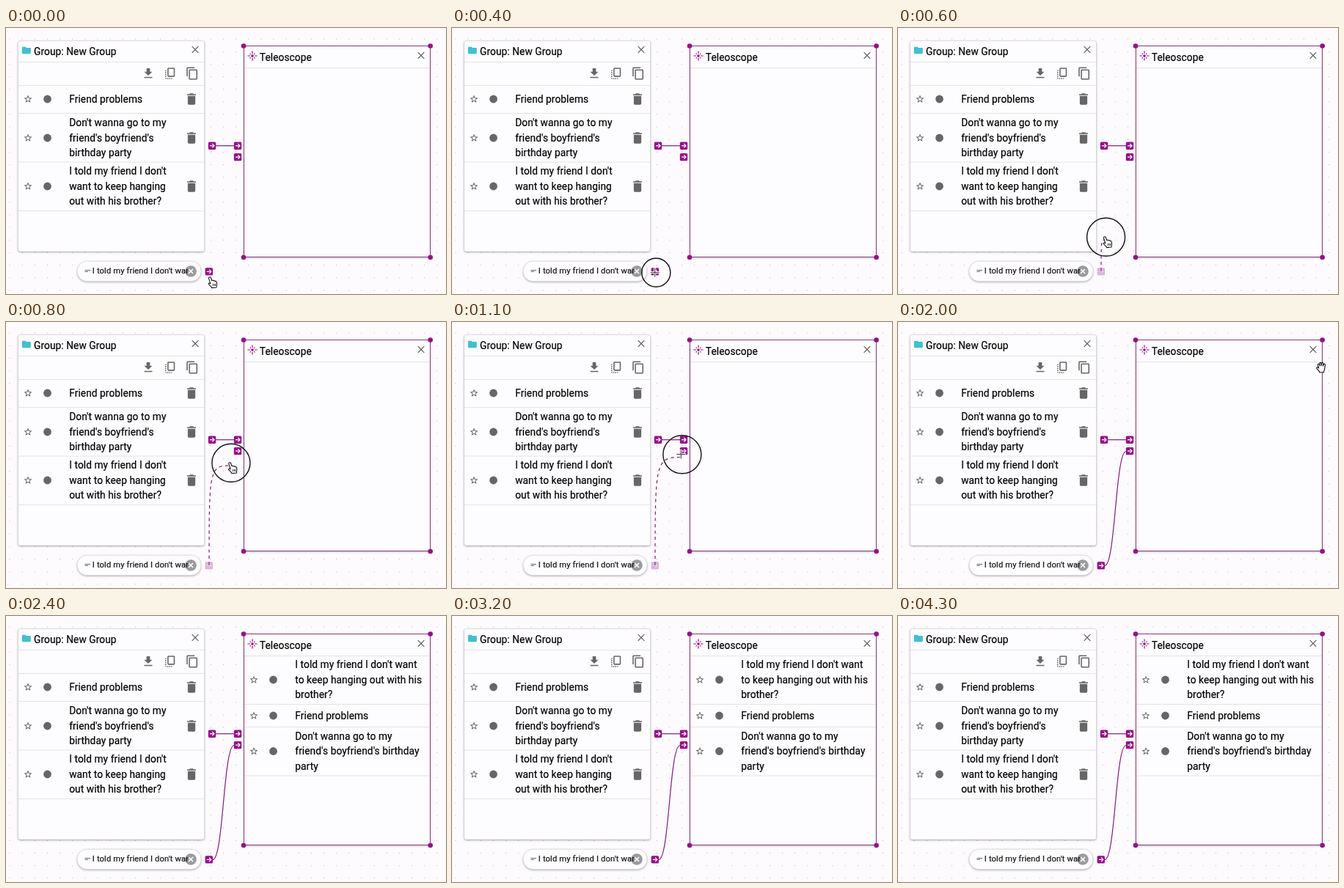
Write an HTML page with a canvas that moves like this. It is 600 px wide and 363 px high and loops after 4400 ms.

```html
<!DOCTYPE html>
<html lang="en">
<head>
<meta charset="utf-8">
<title>Workspace</title>
<style>
html, body { margin: 0; width: 100%; height: 100%; overflow: hidden; background: #fdfbfe; }
canvas { position: absolute; left: 0; top: 0; width: 600px; height: 363px; }
.text {
  position: absolute; white-space: pre; color: #000; -webkit-text-stroke: .2px #000;
  font: 13.71px/20.57px Roboto, Arial, sans-serif; letter-spacing: .08px;
}
.chip { font-size: 11.14px; letter-spacing: .15px; width: 131.2px; overflow: hidden; color: #1a1a1a; }
</style>
</head>
<body>
<canvas id="base"></canvas>
<div id="labels"></div>
<div id="results"></div>
<canvas id="over"></canvas>
<script>
const LOOP = 4400, STEP = 100, LINK = 1300, CUT = 2200;
const PURPLE = '#960f89', EDGE = '#7f1c79', FRAME = '#85407f', GREY = '#666', RULE = '#e5e3e7', PAPER = '#fdfcfe';
const LINE = 20.57, GAP = 17.14;

const ICON = {
  star: 'M22 9.24l-7.19-.62L12 2 9.19 8.63 2 9.24l5.46 4.73L5.82 21 12 17.27 18.18 21l-1.63-7.03L22 9.24zM12 15.4l-3.76 2.27 1-4.28-3.32-2.88 4.38-.38L12 6.1l1.71 4.04 4.38.38-3.32 2.88 1 4.28L12 15.4z',
  trash: 'M6 19c0 1.1.9 2 2 2h8c1.1 0 2-.9 2-2V7H6v12zM19 4h-3.5l-1-1h-5l-1 1H5v2h14V4z',
  download: 'M19 9h-4V3H9v6H5l7 7 7-7zM5 18v2h14v-2H5z',
  copyAll: 'M18 2H9c-1.1 0-2 .9-2 2v12c0 1.1.9 2 2 2h9c1.1 0 2-.9 2-2V4c0-1.1-.9-2-2-2zm0 14H9V4h9v12zM3 15v-2h2v2H3zm0-5.5h2v2H3v-2zM10 20h2v2h-2v-2zm-7-1.5v-2h2v2H3zM5 22c-1.1 0-2-.9-2-2h2v2zm3.5 0h-2v-2h2v2zm5 0v-2h2c0 1.1-.9 2-2 2zM5 6v2H3c0-1.1.9-2 2-2z',
  copy: 'M16 1H4c-1.1 0-2 .9-2 2v14h2V3h12V1zm3 4H8c-1.1 0-2 .9-2 2v14c0 1.1.9 2 2 2h11c1.1 0 2-.9 2-2V7c0-1.1-.9-2-2-2zm0 16H8V7h11v14z',
  folder: 'M10 4H4c-1.1 0-1.99.9-1.99 2L2 18c0 1.1.9 2 2 2h16c1.1 0 2-.9 2-2V8c0-1.1-.9-2-2-2h-8l-2-2z',
  flare: 'M7 11H1v2h6v-2zm2.17-3.24L7.05 5.64 5.64 7.05l2.12 2.12 1.41-1.41zM13 1h-2v6h2V1zm5.36 6.05l-1.41-1.41-2.12 2.12 1.41 1.41 2.12-2.12zM17 11v2h6v-2h-6zm-5-2c-1.66 0-3 1.34-3 3s1.34 3 3 3 3-1.34 3-3-1.34-3-3-3zm2.83 7.24l2.12 2.12 1.41-1.41-2.12-2.12-1.41 1.41zm-9.19.71l1.41 1.41 2.12-2.12-1.41-1.41-2.12 2.12zM11 23h2v-6h-2v6z',
  short: 'M4 9h16v2H4zm0 4h10v2H4z'
};
const POINTER = new Path2D('M-1.2.2C-.2-.8 1-.2 1.4 1L2.6 4.6C3.6 4 4.6 4.2 5 5C6 4.6 7 4.9 7.3 5.7C8.4 5.4 9.1 6 9.3 7C9.8 9.4 9.6 11 9 14L2.6 14.6C2 12.6.2 11.4-1.6 9.6C-2.4 8.6-1.2 7.6-.2 8.2L.8 8.9L-1.4 1.8C-1.6 1-1.6.6-1.2.2Z');
const HAND = new Path2D('M-3.2 1L-4.6-3.4C-4.8-4.8-3-5.2-2.5-4L-1.8-2L-2.2-5.6C-2.2-7-.4-7.2-.1-5.8L.2-2.4L.8-6C1.2-7.2 2.8-6.8 2.7-5.4L2.5-2L3.6-4.4C4.4-5.5 5.8-4.8 5.5-3.4L4.8 1.4C4.6 3.6 3.6 4.6 3.6 6.8L-2 6.8C-2.6 4.6-4.4 3.4-6 1.2C-6.8-.2-5-1-4.2 0Z');

// Cursor track: time, x, y
const TRACK = [
  [0, 278, 340], [100, 278, 339], [200, 277, 335], [400, 276.7, 333.5], [500, 277.5, 326],
  [600, 282, 285], [700, 295, 232], [800, 305.3, 192], [1000, 311.5, 182], [1200, 313, 179],
  [1500, 313, 179], [1600, 345, 152], [1700, 408, 108], [1800, 470, 78], [1900, 545, 66], [2000, 577, 62]
];
// Click ring: time, radius
const RING = [[300, 13], [400, 19.5], [500, 26], [1200, 26], [1300, 20], [1400, 10]];

function setup(id) {
  const c = document.getElementById(id), k = window.devicePixelRatio || 1;
  c.width = 600 * k;
  c.height = 363 * k;
  const g = c.getContext('2d');
  g.scale(k, k);
  return g;
}
const base = setup('base'), over = setup('over');
const results = document.getElementById('results');

function sample(keys, t, i) {
  const n = keys.findIndex(k => k[0] >= t);
  if (n < 0) return keys[keys.length - 1][i];
  if (n === 0) return keys[0][i];
  const a = keys[n - 1], b = keys[n];
  return a[i] + (b[i] - a[i]) * (t - a[0]) / (b[0] - a[0]);
}

function icon(g, name, x, y, scale, color) {
  g.save();
  g.translate(x, y);
  g.scale(scale, scale);
  g.translate(-12, -12);
  g.fillStyle = color;
  g.fill(new Path2D(ICON[name]));
  g.restore();
}
function dot(g, x, y, r, color) {
  g.fillStyle = color;
  g.beginPath();
  g.arc(x, y, r, 0, 7);
  g.fill();
}
function box(g, x, y, w, h, r, color) {
  g.fillStyle = color;
  g.beginPath();
  g.roundRect(x, y, w, h, r);
  g.fill();
}
function stroke(g, points, color, width) {
  g.strokeStyle = color;
  g.lineWidth = width;
  g.beginPath();
  points.forEach(p => g.lineTo(p[0], p[1]));
  g.stroke();
}
function cross(x, y, r, color, width) {
  stroke(base, [[x - r, y - r], [x + r, y + r]], color, width);
  stroke(base, [[x + r, y - r], [x - r, y + r]], color, width);
}
function paper(x, y, w, h, r) {
  base.save();
  base.shadowColor = 'rgba(0,0,0,.32)';
  base.shadowBlur = 3;
  base.shadowOffsetY = 1;
  box(base, x, y, w, h, r, PAPER);
  base.restore();
  base.strokeStyle = 'rgba(0,0,0,.12)';
  base.lineWidth = .7;
  base.stroke();
}
function rule(g, x1, x2, y) { stroke(g, [[x1, y], [x2, y]], RULE, 1); }

function port(g, x, y, alpha = 1) {
  g.save();
  g.globalAlpha = alpha;
  box(g, x - 5.2, y - 5.2, 10.4, 10.4, 1.6, PURPLE);
  stroke(g, [[x - 3, y], [x + 2.8, y]], '#fff', 1.2);
  stroke(g, [[x + .3, y - 2.7], [x + 3, y], [x + .3, y + 2.7]], '#fff', 1.2);
  g.restore();
}

function label(parent, x, mid, lines, cls = '') {
  const d = document.createElement('div');
  d.className = 'text ' + cls;
  d.style.left = x + 'px';
  d.style.top = mid - lines.length * LINE / 2 + 'px';
  d.textContent = lines.join('\n');
  parent.append(d);
}
function marks(g, x, y) {
  icon(g, 'star', x, y, .54, '#555');
  dot(g, x + 26.5, y, 5.4, GREY);
}

function drawBase() {
  for (let x = 5; x < 600; x += GAP)
    for (let y = 15 - GAP; y < 363; y += GAP) dot(base, x, y, .5, '#a3a3aa');

  paper(16.5, 17.5, 254, 287.5, 3);
  [46.5, 78.5, 116.5, 183, 249.5].forEach(y => rule(base, 17, 270, y));
  icon(base, 'folder', 27.8, 30.5, .6, '#41bfd0');
  cross(258, 29.5, 4.3, '#555', 1.1);
  icon(base, 'download', 194, 62, .78, GREY);
  icon(base, 'copyAll', 224, 62, .78, GREY);
  icon(base, 'copy', 254, 62, .78, GREY);
  [97, 150, 216].forEach(y => {
    marks(base, 30, y);
    icon(base, 'trash', 253, y, .857, GREY);
  });

  paper(324.5, 24.5, 254, 288, 1);
  rule(base, 325, 578, 54.5);
  base.strokeStyle = FRAME;
  base.lineWidth = 1;
  base.strokeRect(324.5, 24.5, 254, 288);
  for (const x of [324, 578.7]) for (const y of [24.5, 313]) dot(base, x, y, 3.3, PURPLE);
  icon(base, 'flare', 336, 38, .6, PURPLE);
  cross(566, 37.5, 4.3, '#555', 1.1);

  stroke(base, [[285, 160.7], [311, 160.7]], EDGE, 1.2);
  port(base, 281, 160.7);
  port(base, 316, 160.7);
  port(base, 316, 176.1);

  paper(97, 318.3, 169, 27.4, 13.7);
  icon(base, 'short', 111.2, 331.7, .47, '#555');
  dot(base, 252, 332, 7.8, '#9b9a9c');
  cross(252, 332, 3, '#fff', 1.6);
}

function drawLabels() {
  const all = document.getElementById('labels');
  label(all, 38, 32, ['Group: New Group']);
  label(all, 345.8, 40, ['Teleoscope']);
  label(all, 86.2, 97, ['Friend problems']);
  label(all, 86.2, 150, ["Don't wanna go to my", "friend's boyfriend's", 'birthday party']);
  label(all, 86.2, 216, ["I told my friend I don't", 'want to keep hanging', 'out with his brother?']);
  label(all, 117.8, 332, ["I told my friend I don't wanna"], 'chip');
  label(results, 394.3, 87, ["I told my friend I don't want", 'to keep hanging out with his', 'brother?']);
  label(results, 394.3, 136, ['Friend problems']);
  label(results, 394.3, 184.5, ["Don't wanna go to my", "friend's boyfriend's birthday", 'party']);
}

function drawResults(g) {
  [120.5, 151.5, 218].forEach(y => rule(g, 325, 578, y));
  [87, 136, 184.5].forEach(y => marks(g, 338, y));
}

function drawLink(g, t, x, y) {
  const dragging = t >= 500 && t < LINK;
  if (dragging || t >= LINK) {
    g.save();
    g.strokeStyle = EDGE;
    g.lineWidth = 1.2;
    g.beginPath();
    if (dragging) {
      const ey = y + 4;
      g.setLineDash([4.3, 4.3]);
      g.moveTo(277, 332);
      g.bezierCurveTo(277, 332 + (ey - 332) * .95, 277, ey, x, ey);
    } else {
      g.moveTo(282, 332.4);
      g.bezierCurveTo(296.5, 332.4, 296.5, 176.5, 311, 176.5);
    }
    g.stroke();
    g.restore();
  }
  port(g, 276.8, 332.4, dragging ? .3 : 1);
}

function drawCursor(g, t, x, y) {
  const plus = (t >= 200 && t < 500) || (t >= 1000 && t < 1600);
  if (plus) {
    for (const [color, w, r] of [['#fff', 3, 6.5], ['#444', 1.1, 6]]) {
      stroke(g, [[x - r, y], [x + r, y]], color, w);
      stroke(g, [[x, y - r], [x, y + r]], color, w);
    }
    return;
  }
  const shape = t < 1600 ? POINTER : HAND;
  g.save();
  g.translate(x, y);
  g.lineJoin = 'round';
  g.fillStyle = '#fff';
  g.strokeStyle = '#111';
  g.lineWidth = 1.1;
  g.fill(shape);
  g.stroke(shape);
  if (shape === POINTER) for (const k of [4, 5.8, 7.4]) stroke(g, [[k, 9], [k + .2, 12]], '#111', .8);
  g.restore();
}

function drawRing(g, t, x, y) {
  if (t < 300 || t > 1400) return;
  g.strokeStyle = '#111';
  g.lineWidth = 1.4;
  g.beginPath();
  g.arc(x + 1.6, y + .3, sample(RING, t, 1), 0, 7);
  g.stroke();
}

function draw(now) {
  const t = Math.floor(now % LOOP / STEP) * STEP;
  const x = sample(TRACK, t, 1), y = sample(TRACK, t, 2);
  over.clearRect(0, 0, 600, 363);
  results.style.display = t >= CUT ? '' : 'none';
  drawLink(over, t, x, y);
  if (t >= CUT) drawResults(over);
  else {
    drawRing(over, t, x, y);
    drawCursor(over, t, x, y);
  }
}

drawBase();
drawLabels();
const start = performance.now();
function tick() {
  draw(performance.now() - start);
  requestAnimationFrame(tick);
}
tick();
</script>
</body>
</html>
```
